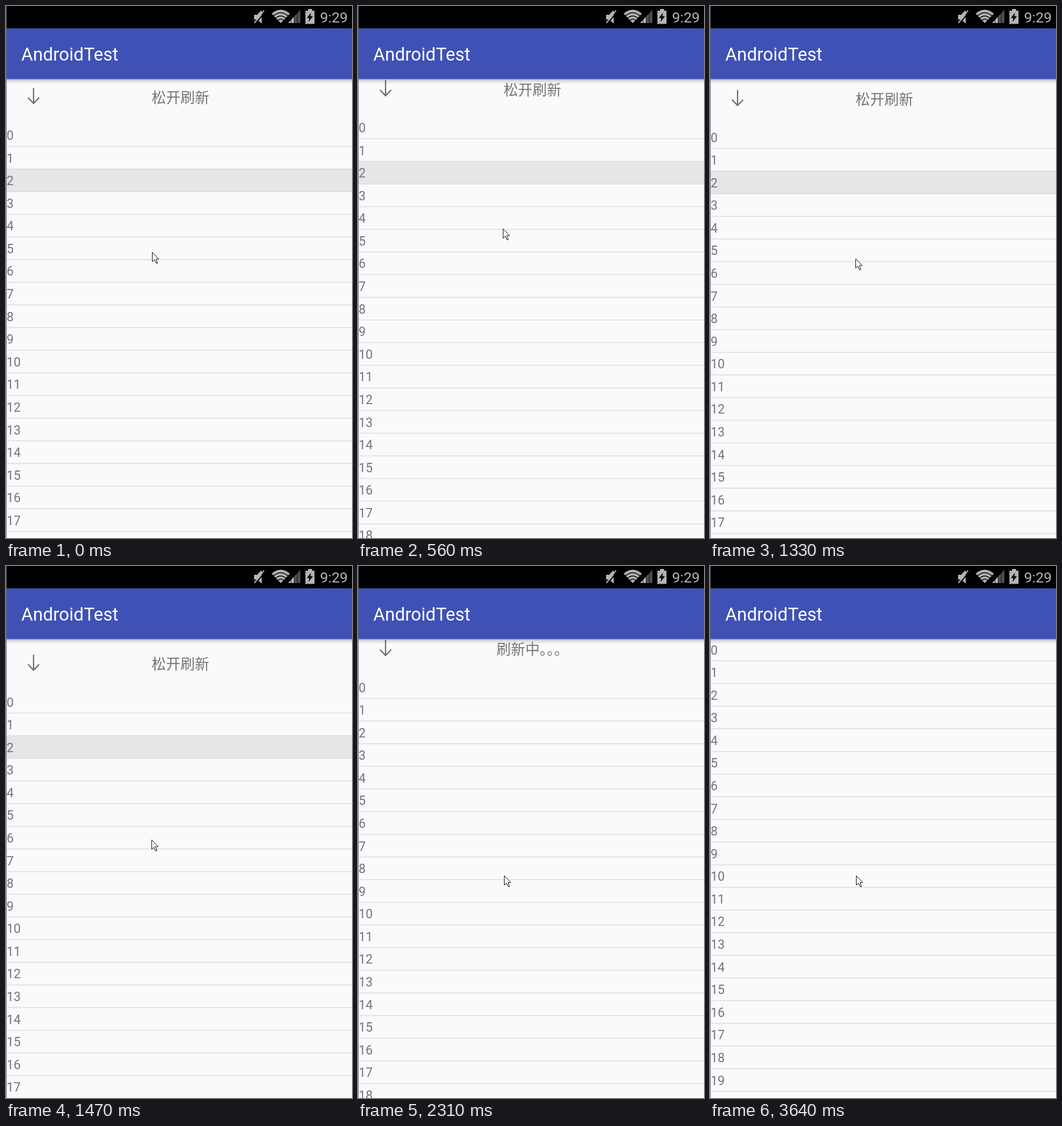
Recreate the animation shown at these times as an HTML page. Size 590 by 906 pixels, loop 4.2 s.

```html
<!DOCTYPE html>
<html lang="zh-CN">
<head>
<meta charset="utf-8">
<title>Pull to refresh</title>
<style>
  html, body { margin: 0; width: 100%; height: 100%; overflow: hidden; background: #fafafa; }
  svg { display: block; width: 590px; height: 906px; font-family: Roboto, 'Noto Sans CJK SC', 'Noto Sans CJK', sans-serif; }
</style>
</head>
<body>
<svg viewBox="0 0 590 906">
  <defs>
    <linearGradient id="shade" x2="0" y2="1">
      <stop offset="0" stop-color="#000" stop-opacity=".36"/>
      <stop offset=".3" stop-color="#000" stop-opacity=".14"/>
      <stop offset="1" stop-color="#000" stop-opacity="0"/>
    </linearGradient>
  </defs>
  <rect width="590" height="906" fill="#fafafa"/>

  <g id="content" fill="#757575">
    <path d="M47 62V88M37.5 78.5L47 88.3L56.5 78.5" fill="none" stroke="#707070" stroke-width="2.2"/>
    <text id="label" x="297.5" y="87" font-size="24.6" text-anchor="middle"></text>
    <rect id="pressed" y="200" width="590" height="38.6" fill="#e6e6e6"/>
    <g id="rows" font-size="21.5"></g>
  </g>

  <rect y="124" width="590" height="9" fill="url(#shade)"/>
  <rect y="37" width="590" height="87.3" fill="#3f51b5"/>
  <text x="26" y="93" font-size="30.7" fill="#fff">AndroidTest</text>

  <rect width="590" height="38" fill="#000"/>
  <g id="status" fill="#b4b4b4">
    <path d="M423 15H428L436 7V30L428 23H423Z"/>
    <path d="M426 30L442 9" stroke="#000" stroke-width="2"/>
    <path d="M423.5 29L440 7.500" stroke="#b4b4b4" stroke-width="2"/>
    <path d="M453 13Q468.500 -0.500 484 13L468.500 29Z"/>
    <g fill="none" stroke="#000" stroke-width="1.5">
      <path d="M456 17Q468.500 6 481 17M459.500 21Q468.500 13 477.500 21M463 25Q468.500 19.500 474 25"/>
    </g>
    <path d="M515 5H522V8H526V30.500H510.500V8H515Z"/>
    <path d="M520.500 11L513 20.500H517.500L515.500 27.500L523.500 17.500H519Z" fill="#000"/>
    <text x="535.5" y="28" font-size="24.6">9:29</text>
  </g>
  <rect width="1" height="906" fill="#596673"/>
  <path id="cursor" d="M.5 .5V16.500L4.200 13L7 19H9.300L6.800 12H11.500Z" fill="#fff" stroke="#111" stroke-width="1"/>
</svg>

<script>
const $ = id => document.getElementById(id);
const LOOP = 4200, STEP = 70, HEADER = 64, PITCH = 38.58;
const RELEASE = 2240, UNPRESS = 2310, DONE = 3150, CLOSE = 3640;

// time, list offset, pointer x, pointer y
const drag = [
  [0, 77.5, 249, 419],
  [350, 69, 247, 392],
  [560, 64.5, 247, 379],
  [700, 57, 247, 366],
  [980, 57, 247, 366],
  [1050, 58.5, 247, 370],
  [1330, 81, 248, 430],
  [1540, 93, 248, 484],
  [1750, 95, 248, 504],
  [2030, 95, 249, 527]
];

for (let i = 0, html = ''; i <= 20; i++) {
  const y = 161.5 + i * PITCH;
  html += `<rect y="${y - .75}" width="590" height="1.5" fill="#dedede"/>` +
          `<text x="1" y="${y - 11}">${i}</text>`;
  $('rows').innerHTML = html;
}

// Signal bars: two lit, two dim
for (let i = 0; i < 4; i++) {
  const x = 481 + i * 5.4, w = 4.6, top = v => 29 - (v - 481) * 1.08;
  $('status').insertAdjacentHTML('beforeend',
    `<path d="M${x} 29V${top(x)}L${x + w} ${top(x + w)}V29Z" fill="${i < 2 ? '#b4b4b4' : '#505050'}"/>`);
}

function sample(t) {
  const i = drag.findIndex(k => k[0] > t);
  if (i < 0) return drag[drag.length - 1].slice(1);
  const a = drag[i - 1], b = drag[i], f = (t - a[0]) / (b[0] - a[0]);
  return a.map((v, n) => v + (b[n] - v) * f).slice(1);
}

function labelAt(t, offset) {
  if (t >= DONE) return '刷新完成';
  if (t >= RELEASE) return '刷新中。。。';
  return offset > HEADER ? '松开刷新' : '下拉可以刷新';
}

function draw(now) {
  const t = Math.floor(now % LOOP / STEP) * STEP;
  let [offset, x, y] = sample(t);
  if (t >= RELEASE) offset = t < CLOSE ? HEADER : 0;
  $('content').setAttribute('transform', `translate(0 ${offset})`);
  $('label').textContent = labelAt(t, offset);
  $('pressed').style.display = t < UNPRESS ? '' : 'none';
  $('cursor').setAttribute('transform', `translate(${Math.round(x)} ${Math.round(y)})`);
}

const start = performance.now();
function tick() {
  draw(performance.now() - start);
  requestAnimationFrame(tick);
}
tick();
</script>
</body>
</html>
```
